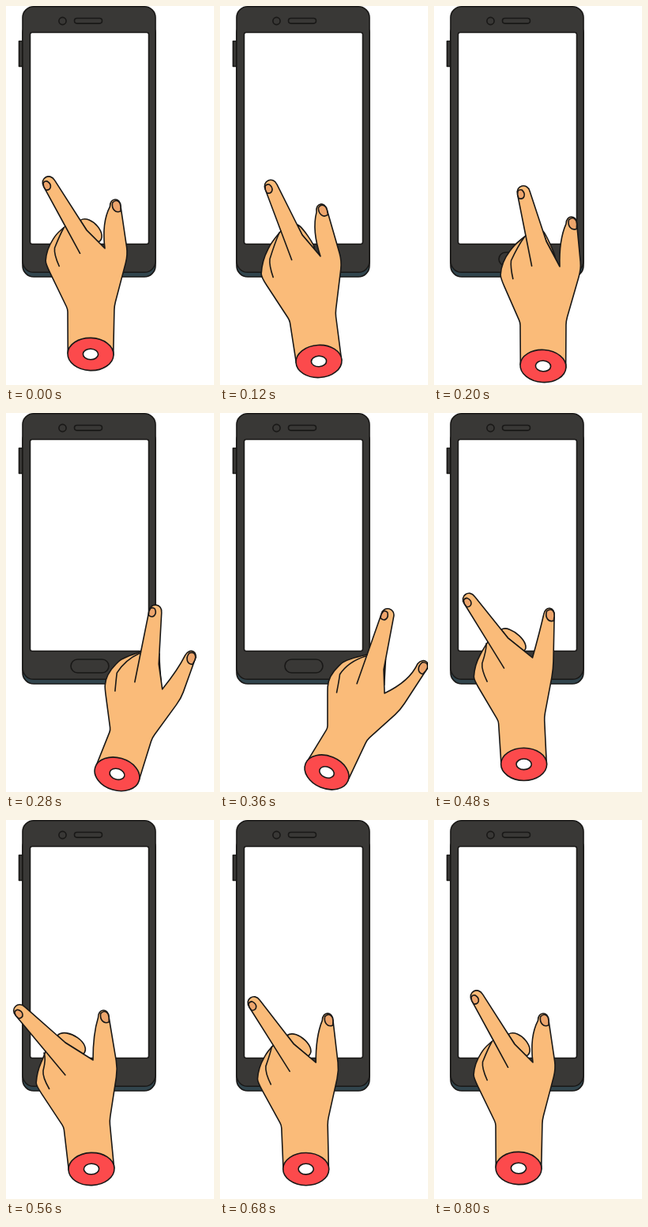
Write an HTML page that moves like this. It is 263 px wide and 480 px high and loops after 1.92 s.

```html
<!DOCTYPE html>
<html lang="en">
<head>
<meta charset="utf-8">
<title>Swiping hand</title>
<style>
  html, body { margin: 0; width: 100%; height: 100%; overflow: hidden; background: #fff; }
  svg { display: block; width: 100%; height: 100%; }
  .ink { stroke: #191817; stroke-width: 1.6; stroke-linecap: round; stroke-linejoin: round; }
  .skin { fill: #fabb79; }
  .nail { fill: #eda56c; }
  .line { fill: none; }
</style>
</head>
<body>
<svg viewBox="0 0 263 480">
  <g class="ink" fill="#393836" stroke-width="1.4">
    <rect x="16.5" y="44.5" width="5" height="32"/>
    <rect x="21" y="20" width="168" height="323" rx="14" fill="#31454d"/>
    <rect x="21" y="0.8" width="168" height="336.5" rx="14"/>
    <rect x="30.5" y="33.5" width="150" height="268" rx="2.5" fill="#fff"/>
    <circle cx="71.5" cy="19" r="4.6"/>
    <rect x="86.5" y="15.5" width="35" height="6.6" rx="3.3"/>
    <rect x="82" y="312" width="48" height="17" rx="8.5"/>
  </g>
  <g class="ink">
    <path id="curl" class="skin"/>
    <path id="hand" class="skin"/>
    <path id="indexNail" class="nail"/>
    <path id="thumbNail" class="nail"/>
    <path id="creases" class="line"/>
    <g id="cut">
      <ellipse rx="29" ry="20.6" fill="#fc4a4c"/>
      <ellipse rx="9.6" ry="6.8" fill="#fff"/>
    </g>
  </g>
</svg>
<script>
const LOOP = 1920, STEP = 40, WRIST = 28.7;

// Points: wrist, left kink, palm, fold, index join, index tip, index right side,
// web, thumb tip, right palm, right kink; then curled finger bulge and thumb bend.
const rest = [107,441, 78,384, 50,326, 65,287, 75,279, 50,217, 102,284, 125,307, 138,245, 154,315, 137,380, 16,-8];
const start = [125,450, 88,398, 52,343, 66,298, 77,285, 61,221, 104,290, 127,317, 127,251, 154,323, 146,389, 4,-8];
const across = [138,456, 109,401, 84,344, 103,301, 116,291, 111,228, 142,298, 159,330, 174,267, 186,333, 167,399, 2,-6];
const right = [135,455, 136,399, 136,350, 159,312, 186,306, 214,248, 207,325, 208,355, 261,315, 228,376, 186,414, 0,10];
const back = [124,450, 100,393, 78,341, 97,296, 108,288, 100,224, 133,294, 155,324, 193,265, 174,345, 157,394, 7,8];
const left = [108,442, 73,389, 38,336, 48,299, 50,293, 12,236, 75,282, 110,304, 123,241, 141,315, 131,381, 17,-4];
const overshoot = left.map((v, i) => v + 0.12 * (v - back[i]));

const keys = [[0, rest], [120, start], [200, across], [360, right],
  [440, back], [520, overshoot], [560, left], [800, rest]];

const slope = (a, b, i) => (b[1][i] - a[1][i]) / (b[0] - a[0]);

function tangent(k, i) {
  if (k === 0 || k === keys.length - 1) return 0;
  const [p, c, n] = keys.slice(k - 1, k + 2);
  const before = c[0] - p[0], after = n[0] - c[0];
  return (slope(p, c, i) * after + slope(c, n, i) * before) / (before + after);
}

function poseAt(time) {
  const k = keys.findIndex(key => key[0] > time) - 1;
  if (k < 0) return rest;
  const [t0, a] = keys[k], [t1, b] = keys[k + 1];
  const span = t1 - t0, u = (time - t0) / span;
  const ease = u * u * (3 - 2 * u);
  return a.map((v, i) => v + (b[i] - v) * ease + span *
    (u * (1 - u) ** 2 * tangent(k, i) - u * u * (1 - u) * tangent(k + 1, i)));
}

const add = (a, b, s = 1) => [a[0] + b[0] * s, a[1] + b[1] * s];
const sub = (a, b) => add(a, b, -1);
const mix = (a, b, t) => add(a, sub(b, a), t);
const unit = v => { const n = Math.hypot(...v); return [v[0] / n, v[1] / n]; };
const path = (...parts) => parts.map(p =>
  typeof p === 'string' ? p : p.map(n => n.toFixed(2)).join(' ')).join(' ');

// A fingertip with its own axes: "down" runs towards the hand, "side" to the right.
function finger(apex, base, half) {
  const down = unit(sub(base, apex)), side = [down[1], -down[0]];
  const at = (x, y) => add(add(apex, side, x), down, y);
  const l = at(-half, 9), r = at(half, 9);
  const cap = path('C', add(l, down, -12), add(r, down, -12), r);
  return { at, l, r, down, side, cap };
}

const corner = (from, p, to, t) => path('L', mix(p, from, t), 'Q', p, mix(p, to, t));

const part = id => document.getElementById(id);
const draw = (id, ...d) => part(id).setAttribute('d', path(...d));

function render(time) {
  const pose = poseAt(time);
  const pts = Array.from({ length: 11 }, (_, i) => pose.slice(2 * i, 2 * i + 2));
  const [wrist, kinkL, palmL, fold, join, indexTip, indexR, web, thumbTip, palmR, kinkR] = pts;
  const [bulge, bend] = pose.slice(22);

  const index = finger(indexTip, mix(join, indexR, 0.5), 8);
  const thumb = finger(thumbTip, mix(web, palmR, 0.5), 6.8);
  const across = sub(kinkR, kinkL);
  const angle = Math.atan2(across[1], across[0]) + 0.1;
  const rim = [Math.cos(angle) * WRIST, Math.sin(angle) * WRIST];
  const wristL = sub(wrist, rim), wristR = add(wrist, rim);

  const palmBend = [palmL[0] + 1, palmL[1] + (fold[1] - palmL[1]) * 0.45];
  const edge = unit(sub(thumb.l, web));
  const thumbBend = add(mix(web, thumb.l, 0.6), [-edge[1], edge[0]], bend);

  draw('hand', 'M', wristL, corner(wristL, kinkL, palmL, 0.06),
    corner(kinkL, palmL, palmBend, 0.2), 'Q', palmBend, mix(palmBend, fold, 0.6),
    'L', mix(palmBend, fold, 0.75), 'Q', fold, join,
    'L', index.l, index.cap, 'L', indexR, 'L', web,
    'Q', thumbBend, thumb.l, thumb.cap,
    corner(thumb.r, palmR, kinkR, 0.16), corner(palmR, kinkR, wristR, 0.08), 'L', wristR);

  const curlTop = mix(index.r, indexR, 0.8), curlEnd = mix(indexR, web, 0.65);
  draw('curl', 'M', curlTop, 'C', add(curlTop, index.side, bulge),
    add(curlEnd, index.side, bulge), curlEnd, 'L', indexR, 'Z');

  draw('indexNail', 'M', index.at(-7.9, 14), 'C', index.at(-2, 18),
    index.at(3, 12), index.at(-1, 5), 'Q', index.at(-4, 3), index.at(-6.5, 5), 'L', index.l, 'Z');
  draw('thumbNail', 'M', thumb.at(6.7, 15), 'C', thumb.at(0, 18),
    thumb.at(-5, 12), thumb.at(-3.5, 4), 'Q', thumb.at(2, -1.5), thumb.at(6, 5), 'L', thumb.r, 'Z');

  const ray = unit(sub(join, index.l));
  const knuckle = add(mix(palmL, fold, 0.5), [4, 0]);
  const creaseEnd = add(knuckle, [ray[0] * 12, 23]);
  draw('creases', 'M', join, 'L', add(join, ray, 39),
    'M', add(join, [-2, 2]), 'Q', add(fold, [3, 3]), knuckle,
    'Q', add(knuckle, [-1, 8]), creaseEnd);

  part('cut').setAttribute('transform',
    `translate(${wrist[0]} ${wrist[1]}) rotate(${angle * 180 / Math.PI})`);
}

const origin = performance.now();
function tick() {
  const time = (performance.now() - origin) % LOOP;
  render(Math.floor(time / STEP) * STEP);
  requestAnimationFrame(tick);
}
tick();
</script>
</body>
</html>
```
